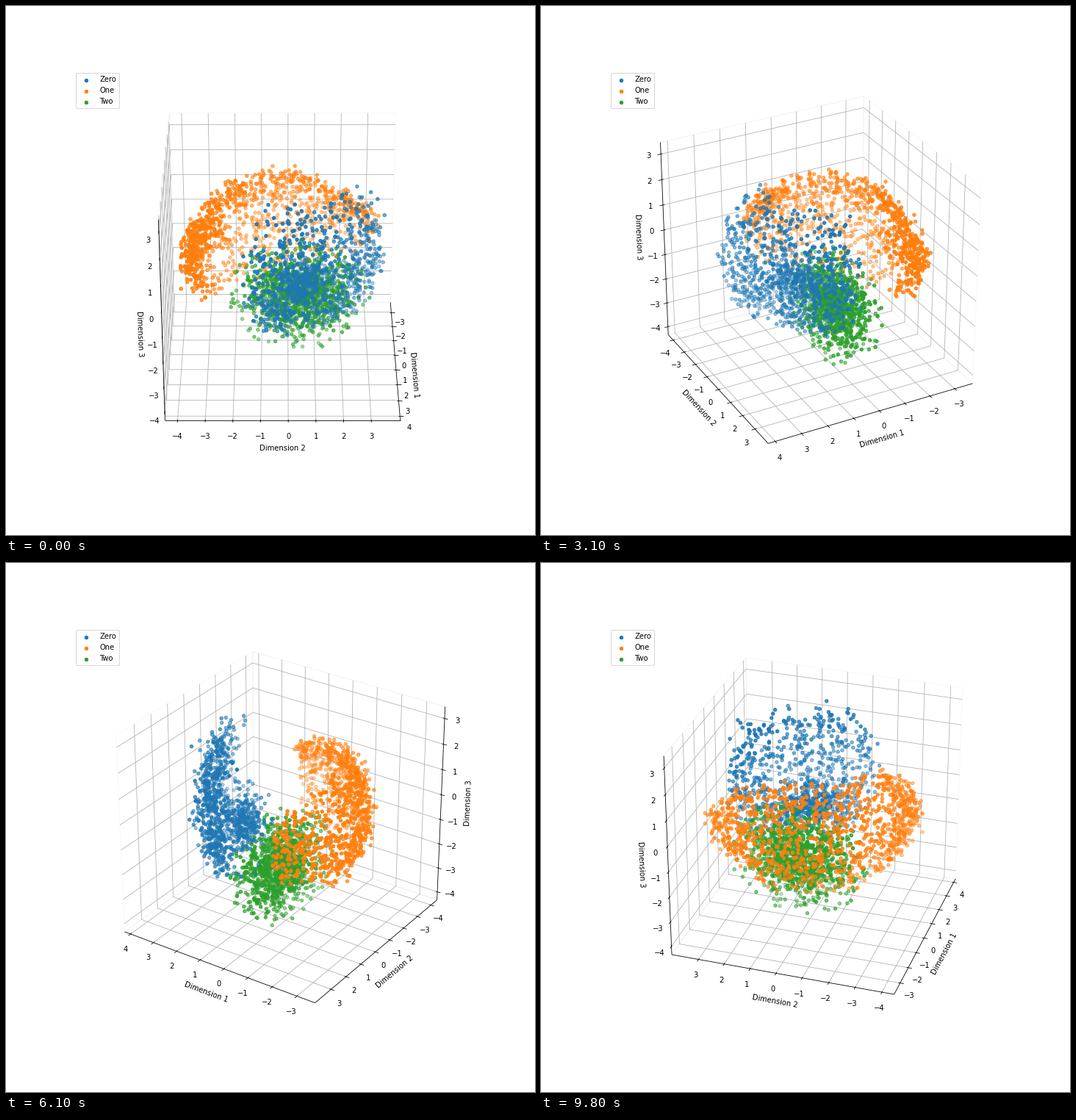
These frames come from a looping animation (720x720 px, 9.9 s). A matplotlib script:

```python
import numpy as np
import matplotlib.pyplot as plt
from matplotlib.animation import FuncAnimation
from matplotlib.collections import LineCollection

plt.rcParams["font.family"] = "DejaVu Sans"

# two degrees per frame, with one position skipped halfway round
AZIMUTHS = np.radians(np.delete(np.arange(0, 200, 2), 51))
ELEV, DIST = np.radians(30), 10
HALF = 0.5 + 1 / 48             # half size of the drawn box, data box is 1
DELTA = 1 / 12
LIMITS = [(-3.566, 4.104), (-4.285, 3.88), (-4.186, 3.298)]
TICKS = [range(-3, 5), range(-4, 4), range(-4, 4)]
TICK_DIR = (1, 0, 0)
PANE_COLORS = [(g, g, g, 0.5) for g in (0.9, 0.925, 0.95)]
AX_W, AX_H = 558, 543.6
PER_POINT = 48 / (AX_W + AX_H)
TICK_PAD = 11.5 * PER_POINT * DELTA
LABEL_PAD = 25 * PER_POINT * DELTA

rng = np.random.default_rng(12)


# ---- point clouds, in box units centred on zero ----

def place(n, t, z):
    """Turn coordinates along the clouds' shared axes into x, y, z."""
    a = np.radians(32)
    x = n * np.cos(a) - t * np.sin(a)
    y = n * np.sin(a) + t * np.cos(a)
    limit = (0.4545, 0.4545, 0.5)
    return np.clip(np.column_stack([x, y, z]), np.negative(limit), limit)


def cloud_zero(sheet=660, foot=320):
    u = rng.uniform(-1, 1, sheet)
    v = 2 * rng.beta(1, 1.2, sheet) - 1
    c = np.sqrt(1 - 0.6 * v**2)
    fan = place(0.13 + 0.21 * np.sqrt(1 - 0.6 * u**2) * c + rng.normal(0, 0.035, sheet),
                0.01 + 0.345 * u * c + rng.normal(0, 0.02, sheet),
                0.13 + 0.31 * v + rng.normal(0, 0.015, sheet))
    base = place(rng.normal(0.17, 0.045, foot),
                 rng.normal(-0.02, 0.09, foot),
                 rng.normal(-0.02, 0.065, foot))
    return rng.permutation(np.vstack([fan, base]))


def cloud_one(count=1135):
    turn = -80 + 175 * rng.beta(1, 1.25, count)
    phi = np.radians(turn)
    v = 2 * rng.beta(1.5, 1.05, count) - 1
    c = np.sqrt(1 - 0.55 * v**2) * rng.normal(0.97, 0.055, count)
    height = 0.28 * (1 - 0.55 * (turn / 95)**2)
    return place(-0.39 * np.cos(phi) * c,
                 0.02 + 0.48 * np.sin(phi) * c,
                 0.06 + height * v + rng.normal(0, 0.02, count))


def cloud_two(count=1032):
    g = rng.normal(size=(count, 3))
    size = np.linalg.norm(g, axis=1, keepdims=True)
    g *= np.minimum(1, 2.7 / size)
    return g * (0.064, 0.12, 0.105) + (-0.045, 0.075, -0.195)


# ---- camera ----

def project(points, az):
    """Return screen positions and distances from the camera."""
    x, y, z = np.moveaxis(np.asarray(points, float), -1, 0)
    ahead = x * np.cos(az) + y * np.sin(az)
    side = y * np.cos(az) - x * np.sin(az)
    w = DIST - ahead * np.cos(ELEV) - z * np.sin(ELEV)
    up = z * np.cos(ELEV) - ahead * np.sin(ELEV)
    return np.stack([side / w, up / w], axis=-1), w


def flipped(point, axis):
    out = point.copy()
    out[axis] *= -1
    return out


def with_value(point, axis, value):
    out = point.copy()
    out[axis] = value
    return out


def pushed_out(point, axis, pad):
    """Move a point away from the centre, except along one axis."""
    shift = np.sign(point) * pad
    shift[axis] = 0
    return point + shift


# ---- stage ----

fig = plt.figure(figsize=(10, 10), dpi=72, facecolor="white")
ax = fig.add_axes((0.125, 0.125, 0.775, 0.755))
ax.set_axis_off()


def add_lines(color, width, z):
    lines = LineCollection([], colors=color, linewidths=width, zorder=z)
    ax.add_collection(lines, autolim=False)
    return lines


panes = add_lines(PANE_COLORS, 1, 1)
grid = add_lines("#b0b0b0", 0.8, 2)
edges = add_lines("black", 0.8, 3)
marks = add_lines("black", 0.8, 3)

locs = [[(v - (lo + hi) / 2) / (hi - lo) for v in values]
        for values, (lo, hi) in zip(TICKS, LIMITS)]
tick_texts = [[ax.text(0, 0, str(v).replace("-", "\u2212"), ha="center", va="top")
               for v in values] for values in TICKS]
names = [ax.text(0, 0, f"Dimension {i + 1}", ha="center", va="center")
         for i in range(3)]

clouds = []
for label, color, points in [("Zero", "#1f77b4", cloud_zero()),
                             ("One", "#ff7f0e", cloud_one()),
                             ("Two", "#2ca02c", cloud_two())]:
    dots = ax.scatter(points[:, 0], points[:, 1], s=20, color=color, label=label)
    rgba = np.tile(dots.get_facecolor()[0], (len(points), 1))
    clouds.append((dots, points, rgba))
ax.set(xlim=(-0.095, 0.09), ylim=(-0.095, 0.09))
ax.legend(loc="upper left").set_zorder(20)


def draw_box(az):
    facing = np.round([np.cos(az), np.sin(az), 1], 9)
    far = np.where(facing < 0, HALF, -HALF)
    pane_paths, grid_paths, edge_paths, mark_paths = [], [], [], []

    for i in range(3):
        j, k = (i + 1) % 3, (i + 2) % 3
        corner = flipped(far, j)
        pane_paths.append([far, corner, flipped(corner, k), flipped(far, k), far])

        across = TICK_DIR[i]
        start = flipped(far, across)
        end = flipped(start, i)
        edge_paths.append([start, end])
        sign = np.sign(far[across])

        for loc, text in zip(locs[i], tick_texts[i]):
            base = with_value(far, i, loc)
            grid_paths.append([flipped(base, j), base, flipped(base, k)])
            pos = with_value(start, i, loc)
            mark_paths.append([
                with_value(pos, across, pos[across] + 0.1 * sign * DELTA),
                with_value(pos, across, pos[across] - 0.2 * sign * DELTA)])
            text.set_position(project(pushed_out(pos, i, TICK_PAD), az)[0])

        middle = pushed_out((start + end) / 2, i, LABEL_PAD)
        names[i].set_position(project(middle, az)[0])
        p, q = project([start, end], az)[0]
        dx, dy = (q - p) * (AX_W, AX_H)
        angle = np.degrees(np.arctan2(dy, dx)) % 180
        names[i].set_rotation(angle - 180 if angle > 90 else angle)

    # panes are coloured in the order y, z, x
    for lines, paths in [(panes, pane_paths[1:] + pane_paths[:1]),
                         (grid, grid_paths), (edges, edge_paths),
                         (marks, mark_paths)]:
        lines.set_segments(project(paths, az)[0])


def draw_clouds(az):
    nearest = []
    for dots, points, rgba in clouds:
        pos, w = project(points, az)
        depth = -1 / w
        fade = (depth - depth.min()) / np.ptp(depth)
        rgba[:, 3] = 1 - 0.7 * fade
        dots.set_offsets(pos)
        dots.set_facecolor(rgba)
        dots.set_edgecolor(rgba)
        nearest.append(w.min())
    for rank, i in enumerate(np.argsort(nearest)[::-1]):
        clouds[i][0].set_zorder(5 + rank)


def draw(frame):
    az = AZIMUTHS[frame]
    draw_box(az)
    draw_clouds(az)
    return []


anim = FuncAnimation(fig, draw, frames=len(AZIMUTHS), interval=100, repeat=True,
                     repeat_delay=0, blit=False, cache_frame_data=False)
plt.show()
```
